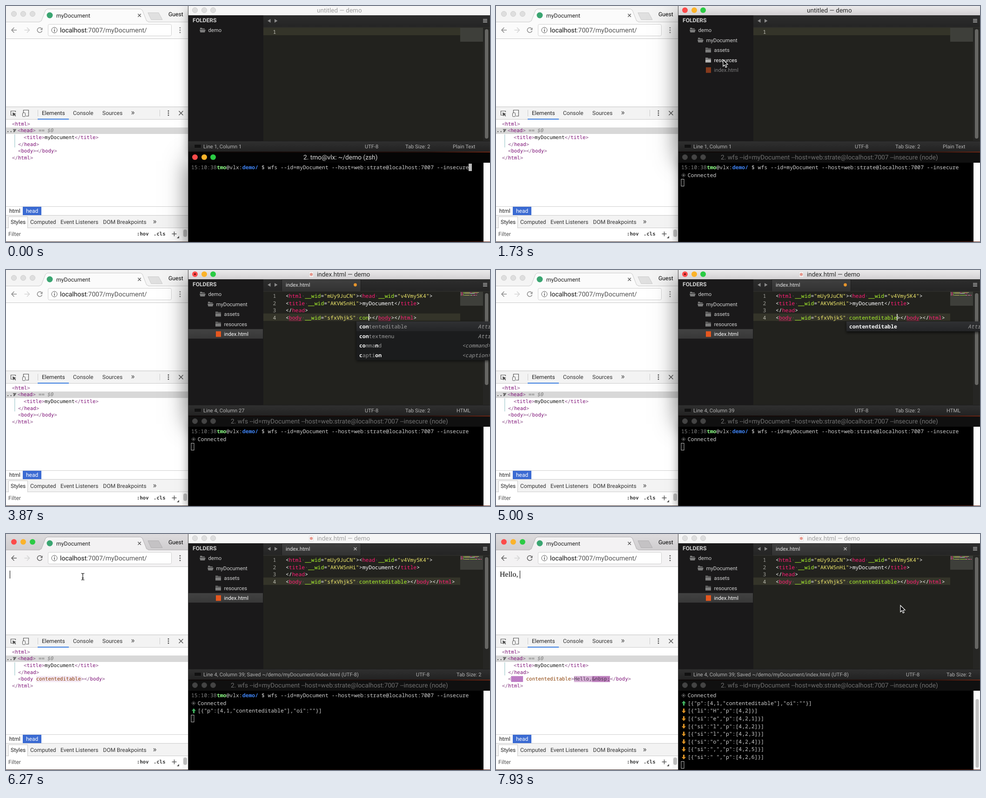
An HTML page with a canvas for the animation above (8 s loop, 1040 by 509 pixels).

```html
<!DOCTYPE html>
<html lang="en">
<head>
<meta charset="utf-8">
<title>Live document sync</title>
<style>
html, body { margin: 0; width: 100%; height: 100%; overflow: hidden; background: #000; }
canvas { display: block; width: 1040px; height: 509px; }
</style>
</head>
<body>
<canvas id="stage" width="1040" height="509"></canvas>
<script>
const c = document.getElementById('stage').getContext('2d');
const LOOP = 8000;
const UI = 'Roboto, sans-serif', CODE = '"Noto Sans Mono", monospace', DOM = '"DejaVu Sans Mono", monospace';
const ui = (n, style = '') => `${style} ${n}px ${UI}`;
const code = (style = '') => `${style} 11.43px ${CODE}`;
const dom = (style = '') => `${style} 10.7px ${DOM}`;
const CW = 6.86, DW = 6.44;
const PINK = '#ff1d74', GREEN = '#a9f52c', YELLOW = '#f1ea6c', WHITE = '#fff';
const TAG = '#7b0c74', BRACKET = '#8c548a';

// Timeline in ms
const T = { enter: 130, connect: 530, folder: 730, edit: 1450, open: 1960, click: 2900,
  type: 3640, step: 59.3, save: 5240, sync: 5400, web: 6050 };
const ADDED = ' contenteditable';
const KEYS = [6530, 6670, 6800, 6930, 7070, 7330, 7700];
const HELLO = 'Hello, ';
const COMMAND = 'wfs --id=myDocument --host=web:strate@localhost:7007 --insecure';

const clamp = (v, a = 0, b = 1) => Math.min(b, Math.max(a, v));

function rect(x, y, w, h, fill) { c.fillStyle = fill; c.fillRect(x, y, w, h); }
function round(x, y, w, h, r, fill, stroke) {
  c.beginPath(); c.roundRect(x, y, w, h, r);
  if (fill) { c.fillStyle = fill; c.fill(); }
  if (stroke) { c.strokeStyle = stroke; c.lineWidth = 1; c.stroke(); }
}
function disc(x, y, r, fill, stroke) {
  c.beginPath(); c.arc(x, y, r, 0, 7);
  if (fill) { c.fillStyle = fill; c.fill(); }
  if (stroke) { c.strokeStyle = stroke; c.lineWidth = 1; c.stroke(); }
}
function poly(pts, fill, stroke, width = 1, close = true) {
  c.beginPath();
  for (let i = 0; i < pts.length; i += 2) c.lineTo(pts[i], pts[i + 1]);
  if (close) c.closePath();
  if (fill) { c.fillStyle = fill; c.fill(); }
  if (stroke) { c.strokeStyle = stroke; c.lineWidth = width; c.stroke(); }
}
const line = (pts, color, width = 1) => poly(pts, null, color, width, false);
function text(s, x, y, color, font) {
  c.font = font; c.fillStyle = color; c.fillText(s, x, y);
}
function fade(y0, y1, a, b) {
  const g = c.createLinearGradient(0, y0, 0, y1);
  g.addColorStop(0, a); g.addColorStop(1, b);
  return g;
}
function lights(xs, y, on, off, edge, dirty) {
  xs.forEach((x, i) => disc(x, y, on ? 6 : 5.6, on ? ['#fc4b4a', '#fbb32a', '#2bcb44'][i] : off, on ? null : edge));
  if (dirty) disc(xs[0], y, 2, '#6a0b0a');
}
const blink = (t, since) => (t - since) % 1060 < 530;

// Shadow a window throws on the browser to its left
function shade(y, h, front) {
  c.save();
  c.beginPath(); c.rect(0, 0, 391, 509); c.clip();
  c.shadowColor = `rgba(0,0,0,${front ? .6 : .42})`;
  c.shadowBlur = front ? 46 : 20;
  c.shadowOffsetY = front ? 18 : 8;
  rect(392, y, 648, h, '#000');
  c.restore();
}

function state(t) {
  const typed = clamp(Math.floor((t - T.type) / T.step) + 1, 0, ADDED.length);
  return {
    focus: t < T.edit ? 'term' : t < T.web ? 'edit' : 'web',
    open: t >= T.open, typed, dirty: typed > 0 && t < T.save,
    row: t < T.click ? 0 : 3, saved: t >= T.save, synced: t >= T.sync,
    keys: KEYS.filter(k => t >= k).length
  };
}

// ---------- Browser ----------
function browser(t, s) {
  const on = s.focus === 'web';
  rect(0, 0, 391, 509, '#fff');
  rect(0, 0, 391, 35, on ? fade(0, 35, '#dddbdd', '#cfcdcf') : '#f4f4f4');
  lights([17, 37, 57], 17, on, '#dedede', '#cfcfcf');
  const bar = on ? '#f3f2f3' : '#fbfbfb', edge = on ? '#b2b0b2' : '#cbcbcb';
  line([0, 34.5, 391, 34.5], edge);
  poly([71, 35, 76, 32, 85, 9, 89, 6.5, 289, 6.5, 293, 9, 302, 32, 307, 35], bar);
  line([71, 34.5, 76, 32, 85, 9, 89, 6.5, 289, 6.5, 293, 9, 302, 32, 307, 34.5], edge);
  poly([305, 14.5, 328, 14.5, 336, 29.5, 312, 29.5], on ? '#c4c2c4' : '#e0e0e0', edge);
  rect(0, 35, 391, 35, bar);
  disc(94, 20, 6.5, '#3aa571');
  text('myDocument', 108, 24.5, '#222', ui(12.3));
  line([283.5, 17, 290, 23.5], '#555', 1.3);
  line([290, 17, 283.5, 23.5], '#555', 1.3);
  text('Guest', 349, 21.5, '#000', ui(12.2));
  const icon = on ? '#626262' : '#8c8c8c';
  const arrow = (x, d, col) => {
    line([x - d, 52, x + d, 52], col, 1.5);
    line([x, 46.5, x + d, 52, x, 57.5], col, 1.5);
  };
  arrow(17.5, -5.5, icon); arrow(45, 5.5, '#d4d4d4');
  c.beginPath(); c.arc(72.5, 52, 5.2, .3, 5.5);
  c.strokeStyle = icon; c.lineWidth = 1.5; c.stroke();
  poly([78.5, 46.5, 78.5, 51.5, 73.5, 51.5], icon);
  round(90.5, 39.5, 265, 25, 3, '#fff', '#cfcfcf');
  disc(104, 52, 6, null, '#555');
  rect(103.3, 51, 1.5, 4.5, '#555'); rect(103.3, 48.5, 1.5, 1.5, '#555');
  text('localhost', 116, 57, '#111', ui(14));
  text(':7007/myDocument/', 173.2, 57, '#505050', ui(14));
  for (const y of [47, 52, 57]) disc(374, y, 1.5, icon);
  line([0, 70.5, 391, 70.5], '#c9c9c9');

  text(HELLO.slice(0, s.keys), 8, 92, '#000', '16px "Liberation Serif", serif');
  if (on) {
    const last = s.keys ? KEYS[s.keys - 1] : T.web;
    const w = c.measureText(HELLO.slice(0, s.keys)).width;
    if (blink(t, last)) rect(Math.floor(8 + w), 79, 1, 17, '#000');
  }
  devtools(t, s);
  if (!on) {
    shade(0, 314, s.focus === 'edit');
    shade(316, 192, s.focus === 'term');
  }
  rect(391, 0, 1, 509, '#4a4a4a');
  rect(0, 508, 392, 1, '#3c2a26');
}

function devtools(t, s) {
  rect(0, 217, 391, 28, '#f3f3f3');
  line([0, 217.5, 391, 217.5], '#c4c4c4');
  line([0, 244.5, 391, 244.5], '#ccc');
  line([15, 235.5, 10.5, 235.5, 10.5, 226.5, 20.5, 226.5, 20.5, 229], '#5a5a5a', 1.2);
  poly([14, 229.5, 22, 233, 18.8, 234, 21.5, 237, 20, 238, 17.5, 235, 15.5, 238], '#4a4a4a');
  line([37.5, 230, 37.5, 224.5, 48.5, 224.5, 48.5, 237.5, 43, 237.5], '#5a5a5a', 1.2);
  round(35.5, 230.5, 6, 8, 1, '#f3f3f3', '#5a5a5a');
  for (const x of [68.5, 330.5]) line([x, 224, x, 238], '#ccc');
  text('Elements', 77, 235, '#222', ui(12));
  text('Console', 144, 235, '#333', ui(12));
  text('Sources', 207, 235, '#333', ui(12));
  text('»', 268.5, 235, '#444', ui(17));
  rect(68, 243, 67, 2, '#3d7fe0');
  for (const y of [226.5, 231, 235.5]) disc(349, y, 1.4, '#555');
  line([371.5, 226.5, 380.5, 235.5], '#555', 1.5);
  line([380.5, 226.5, 371.5, 235.5], '#555', 1.5);

  const rowY = i => 257.5 + i * 14.7;
  rect(0, 262, 391, 14, '#d8d8d8');
  rect(18, 277, 1.5, 28, '#b5d6d8');
  text('...', 1, rowY(1), '#444', dom('bold'));
  poly([14.5, 265.5, 22.5, 265.5, 18.5, 272], '#6a6a6a');
  tag('<html>', 13, rowY(0));
  text('== $0', 70, rowY(1), '#777', dom('italic'));
  tag('<head>', 25, rowY(1));
  tag('<title>', 38, rowY(2));
  text('myDocument', 38 + 7 * DW, rowY(2), '#111', dom());
  tag('</title>', 38 + 17 * DW, rowY(2));
  tag('</head>', 26, rowY(3));
  bodyRow(t, s, rowY(4));
  tag('</html>', 13, rowY(5));

  line([0, 432.5, 391, 432.5], '#d0d0d0');
  text('html', 7, 446, '#222', ui(12));
  rect(36, 433, 40, 18, '#3b6bd3');
  text('head', 43, 446, '#fff', ui(12));
  rect(0, 451, 391, 28, '#f3f3f3');
  line([0, 451.5, 391, 451.5], '#ccc');
  line([0, 478.5, 391, 478.5], '#ccc');
  poly([5.5, 479, 5.5, 454.5, 46.5, 454.5, 46.5, 479], '#fff', '#ccc');
  rect(6, 477, 40, 3, '#fff');
  text('Styles', 10, 470, '#222', ui(12));
  text('Computed', 52, 470, '#333', ui(12));
  text('Event Listeners', 117, 470, '#333', ui(12));
  text('DOM Breakpoints', 208.5, 470, '#333', ui(12));
  text('»', 315.5, 470, '#444', ui(17));
  text('Filter', 5, 495.5, '#555', ui(12));
  text(':hov', 281, 495, '#333', dom('bold'));
  text('.cls', 317, 495, '#333', dom('bold'));
  line([356.5, 491.5, 366.5, 491.5], '#555', 1.5);
  line([361.5, 486.5, 361.5, 496.5], '#555', 1.5);
  poly([372, 496, 372, 501, 367, 501], '#555');
  rect(379, 480, 12, 28, '#f8f8f8');
  round(381, 482, 8, 16, 4, '#bcbcbc');
}

function tag(s, x, y) {
  const [, open, name] = s.match(/(<\/?)(\w+)/);
  text(open, x, y, BRACKET, dom());
  text(name, x + open.length * DW, y, TAG, dom());
  text('>', x + (s.length - 1) * DW, y, BRACKET, dom());
}

function flash(x, y, n, a) {
  if (a > 0) rect(x, y - 10, n * DW, 13, `rgba(150,50,150,${a})`);
}

function bodyRow(t, s, y) {
  let x = 26;
  const ago = s.keys ? t - KEYS[s.keys - 1] : 1e4, heat = clamp(1 - ago / 1000);
  if (!s.synced) { tag('<body>', x, y); tag('</body>', x + 6 * DW, y); return; }
  text('<', x, y, BRACKET, dom());
  text('body', x + DW, y, TAG, dom());
  if (heat > 0) {
    c.save();
    c.globalAlpha = clamp(heat * 1.25);
    c.beginPath(); c.rect(x + DW, y - 10, 4 * DW, 13); c.clip();
    rect(x, y - 10, 5 * DW, 13, '#b873c0');
    for (let i = 0; i < 14; i++) line([x + i * 4 - 10, y + 3, x + i * 4 + 3, y - 10], '#cf9ad5', .8);
    c.restore();
  }
  x += 6 * DW;
  flash(x, y, 15, .9 * clamp(1 - (t - T.sync) / 1000));
  text('contenteditable', x, y, '#8a3f04', dom());
  x += 15 * DW;
  text('>', x, y, BRACKET, dom());
  x += DW;
  const word = HELLO.slice(0, Math.min(s.keys, 6)), nbsp = s.keys > 6 ? '&nbsp;' : '';
  flash(x, y, word.length, .5 * heat);
  flash(x + word.length * DW, y, nbsp.length, .8 * heat);
  text(word + nbsp, x, y, '#4c3a4e', dom());
  tag('</body>', x + (word + nbsp).length * DW, y);
}

// ---------- Editor ----------
function tokens(src) {
  const out = [];
  let inside = false;
  for (const m of src.matchAll(/(<\/?)(\w+)|( )|("[^"]*")|(\w+)|([=>])/g)) {
    if (m[1]) { out.push([m[1], WHITE], [m[2], PINK]); inside = true; }
    else if (m[3]) out.push(['·', '#6a6a5e']);
    else if (m[4]) out.push([m[4], YELLOW]);
    else if (m[5]) out.push([m[5], inside ? GREEN : WHITE]);
    else { out.push([m[6], WHITE]); if (m[6] === '>') inside = false; }
  }
  return out;
}
const source = s => [
  '<html __wid="mUy9JuCN"><head __wid="v4Vmy5K4">',
  '<title __wid="AKVW5nHi">myDocument</title>',
  '</head>',
  `<body __wid="sfxVhjkS"${ADDED.slice(0, s.typed)}></body></html>`
];

function folder(x, y, open, col) {
  if (open) {
    poly([x + 1, y - 5, x + 5, y - 5, x + 6, y - 3.5, x + 11, y - 3.5, x + 11, y - 1.8, x + 1, y - 1.8], col);
    poly([x, y - .8, x + 13, y - .8, x + 11, y + 5, x + 1.5, y + 5], col);
  } else {
    poly([x, y - 5, x + 5, y - 5, x + 6, y - 4, x + 12, y - 4, x + 12, y - 2.8, x, y - 2.8], col);
    rect(x, y - 1.8, 12, 7, col);
  }
}

function sidebar(t, s, mouse) {
  rect(392, 20, 161, 271, '#1a191a');
  text('FOLDERS', 401, 34.5, '#d2d2d2', ui(12.1, 'bold'));
  const rows = [['demo', 0, 1, 0], ['myDocument', 1, t >= T.edit, T.folder],
    ['assets', 2, 0, 1480], ['resources', 2, 0, 1560], ['index.html', 2, 0, 1640]];
  rows.forEach(([name, depth, open, from], i) => {
    const y = 52 + i * 21.55, x = 416 + depth * 17;
    const a = i ? clamp((t - from) / 170) : 1;
    if (!a) return;
    const picked = i === 4 && s.open;
    if (picked) rect(392, 127.5, 160, 20.5, fade(127, 148, '#424242', '#383838'));
    const hover = mouse && t < T.open && mouse.x > 392 && mouse.x < 553 && Math.abs(mouse.y - y) < 10.8 && i > 0;
    c.globalAlpha = a;
    if (i === 4) rect(x + 1, y - 6, 11, 12, '#e5571f');
    else folder(x, y, open, hover ? '#b4b4b4' : '#7c7c7c');
    text(name, x + 18.5, y + 4, hover || picked ? '#fff' : '#d0d0d0', ui(11.3));
    c.globalAlpha = 1;
  });
}

function popup(s) {
  const typed = ADDED.slice(1, s.typed);
  if (!typed || s.saved) return;
  const match = word => {
    let n = 0;
    const hit = [...word].map(ch => ch === typed[n] && ++n > 0);
    return n === typed.length && hit;
  };
  const items = [['contenteditable', 'Attr', 1014], ['contextmenu', 'Attr', 1014],
    ['command', '<command>', 980], ['caption', '<caption>', 980]].filter(it => match(it[0]));
  const h = items.length * 20.6 + 1;
  c.save();
  c.shadowColor = 'rgba(0,0,0,.7)'; c.shadowBlur = 6; c.shadowOffsetY = 2;
  rect(753, 111, 287, h, '#1b1c1d');
  c.restore();
  rect(753, 111, 287, 21, fade(111, 132, '#303133', '#242527'));
  items.forEach(([word, kind, kx], i) => {
    const y = 126.2 + i * 20.6;
    match(word).forEach((hit, j) =>
      text(word[j], 759 + j * CW, y, hit ? '#fff' : '#9a9a9a', code(hit ? 'bold' : '')));
    text(kind, kx, y, '#9a9a9a', code('italic'));
  });
}

function editor(t, s, mouse) {
  const on = s.focus === 'edit';
  rect(392, 0, 648, 20, on ? fade(0, 20, '#ebeaeb', '#d2d0d2') : '#f6f6f6');
  lights([406, 426, 445], 9, on, '#dedede', '#cfcfcf', on && s.dirty);
  const title = on ? '#2a2a2a' : '#a0a0a0';
  if (s.open) {
    c.globalAlpha = on && !s.dirty ? 1 : .6;
    round(651.5, 3.5, 9, 12, 1, '#fff', '#cfcfcf');
    disc(656, 9.5, 3.2, '#dc5a48');
    c.globalAlpha = 1;
  }
  text(s.open ? 'index.html — demo' : 'untitled — demo', 668, 14, title, ui(13.5));
  sidebar(t, s, mouse);

  rect(553, 20, 487, 27, fade(20, 46, '#2d2d2d', '#242424'));
  rect(553, 45, 487, 2, '#2c2c29');
  poly([568.5, 28, 568.5, 36, 562, 32], '#8a8a8a');
  poly([577, 28, 577, 36, 583.5, 32], '#8a8a8a');
  for (const y of [28, 31, 34]) rect(1025, y, 9, 1.6, '#a5a5a5');
  if (s.open) {
    rect(592, 20, 171, 26, fade(20, 46, '#404040', '#323232'));
    line([592.5, 46, 592.5, 20.5, 762.5, 20.5, 762.5, 46], '#1c1c1c');
    text('index.html', 601, 35.5, '#e2e2e2', ui(11.3, t < T.type ? 'italic' : ''));
    if (s.dirty) disc(750.5, 32, 3.4, '#e8952c');
    else {
      line([747.5, 29, 753.5, 35], '#b5b5b5', 1.6);
      line([753.5, 29, 747.5, 35], '#b5b5b5', 1.6);
    }
  }
  rect(553, 47, 487, 244, '#22221e');
  rect(553, 47 + s.row * 15.6, 423, 16, '#343429');
  rect(976, 47, 49, 30, '#3e3f3a');
  const lines = s.open ? source(s) : [''];
  lines.forEach((src, i) => {
    const y = 60 + i * 15.6;
    text(i + 1, 573.5, y, i === s.row ? '#bcbcb0' : '#a0a09a', code());
    let n = 0;
    for (const [str, col] of tokens(src)) {
      const x = 601 + n * CW;
      text(str, x, y, col, code('500'));
      if (str === 'body' && s.typed && on && !s.saved) rect(x, y + 2, 4 * CW, 1, '#b02254');
      if (str !== '·') {
        c.globalAlpha = .75;
        rect(977 + n * .85, 48 + i * 2, str.length * .85, 1, col);
        c.globalAlpha = 1;
      }
      n += str.length;
    }
  });
  if (on && s.open) {
    const last = s.typed ? T.type + (s.typed - 1) * T.step : s.row ? T.click : T.open;
    const col = s.row ? 22 + s.typed : 0;
    if (blink(t, last)) rect(601 + col * CW - .5, 48 + s.row * 15.6, 1.5, 14.5, '#f8f8f0');
  }
  rect(1025, 47, 15, 244, '#262624');
  round(1029, 50, 7.5, s.open ? 198 : 236, 3.7, '#666663');
  popup(s);

  rect(392, 291, 648, 23, fade(291, 314, '#303030', '#222'));
  rect(392, 291, 648, 1, '#1e1e1e');
  round(404.5, 298.5, 15, 8, 1.5, '#111', '#2e2e2e');
  const pos = `Line ${s.row + 1}, Column ${s.row ? 23 + s.typed : 1}`;
  text(pos + (s.saved ? '; Saved ~/demo/myDocument/index.html (UTF-8)' : ''), 424, 306.5, '#b2b2b2', ui(11.15));
  const right = s.saved ? [['UTF-8', 881], ['Tab Size: 2', 968]]
    : [['UTF-8', 771], ['Tab Size: 2', 858], s.open ? ['HTML', 968] : ['Plain Text', 960]];
  for (const [label, x] of right) text(label, x, 306.5, '#b2b2b2', ui(11.15));
}

// ---------- Terminal ----------
function stem(x, y, up, col) {
  const d = up ? -1 : 1;
  poly([x - 1.6, y - 5 * d, x + 1.6, y - 5 * d, x + 1.6, y, x + 4.4, y, x, y + 5.4 * d, x - 4.4, y, x - 1.6, y], col);
}

function terminal(t, s) {
  const on = s.focus === 'term', running = t >= T.enter;
  const strip = c.createLinearGradient(392, 0, 1040, 0);
  strip.addColorStop(0, '#0c0706'); strip.addColorStop(.8, '#250e0a'); strip.addColorStop(1, '#6a2514');
  rect(392, 314, 648, 2, strip);
  rect(392, 316, 648, 22, on ? '#050505' : '#101010');
  lights([406, 426, 445], 326, on, '#444', '#3a3a3a');
  text(running ? `2. ${COMMAND} (node)` : '2. tmo@vlx: ~/demo (zsh)', running ? 483 : 639, 331,
    on ? '#dcdcdc' : '#707070', ui(13.75));
  rect(392, 338, 634, 170, '#000');
  rect(1026, 338, 14, 170, '#fcfcfc');
  rect(392, 508, 648, 1, strip);

  const rows = ['prompt'];
  if (t >= T.connect) rows.push('Connected');
  if (s.synced) rows.push('[{"p":[4,1,"contenteditable"],"oi":""}]');
  const echoed = KEYS.filter(k => t >= k + 90).length;
  for (let i = 0; i < echoed; i++)
    rows.push(i ? `[{"si":"${HELLO[i]}","p":[4,2,${i}]}]` : '[{"li":"H","p":[4,2]}]');
  const skip = Math.max(0, rows.length - 9);
  rows.forEach((row, i) => {
    const y = 348.3 + (i - skip) * 16.58;
    if (i < skip) return;
    if (i === 0) {
      let x = 398;
      for (const [str, col, w] of [['15:10:38', '#808080', ''], ['tmo', '#8dfb86', 'bold'], ['@vlx:', '#c4c4c4', ''],
        ['demo/', '#3f83f2', 'bold'], [' $ ' + COMMAND, '#d0d0d0', '']]) {
        text(str, x, y + 4, col, code(w));
        x += str.length * CW;
      }
      return;
    }
    if (i === 1) {
      poly([403, y - 4.5, 407.5, y, 403, y + 4.5, 398.5, y], null, '#5c5c5c');
      poly([403, y - 2.5, 405.5, y, 403, y + 2.5, 400.5, y], '#6a6a6a');
    } else stem(403.5, y, i === 2, i === 2 ? '#43b562' : '#dd9427');
    text(row, 411.7, y + 4, '#d0d0d0', code());
  });
  const cy = running ? 340.3 + (rows.length - skip) * 16.58 : 340;
  const cx = running ? 397.5 : 994;
  if (on) rect(cx, cy, 7, 16, '#bcbcbc');
  else { c.strokeStyle = '#bcbcbc'; c.lineWidth = 1; c.strokeRect(398, Math.round(cy) + .5, 6, 15); }
  if (skip) round(1030.5, 356, 7, 148, 3.5, '#c2c2c2');
}

// ---------- Pointer ----------
const PATHS = [
  [[950, 640, 230], [1380, 474, 74], [1500, 474, 74], [1730, 488, 116], [1880, 490, 136], [2080, 490, 136],
    [2600, 751, 107], [T.type, 751, 107]],
  [[5560, 751, 107], [5960, 165, 92], [KEYS[0], 165, 92]],
  [[7500, 165, 92], [7880, 869, 154], [LOOP, 869, 154]]
];
function pointer(t) {
  const path = PATHS.find(p => t >= p[0][0] && t < p[p.length - 1][0]);
  if (!path) return null;
  const i = path.findIndex(p => p[0] > t), [t0, x0, y0] = path[i - 1], [t1, x1, y1] = path[i];
  const u = (t - t0) / (t1 - t0), e = u * u * (3 - 2 * u);
  return { x: x0 + (x1 - x0) * e, y: y0 + (y1 - y0) * e };
}
function drawPointer({ x, y }, focus) {
  const page = x < 391 && y > 70 && y < 217;
  const pane = focus === 'edit' && x > 553 && x < 976 && y > 47 && y < 291;
  c.save();
  c.translate(x, y);
  if (page || pane) {
    for (const [col, w] of page ? [['#fff', 2.6], ['#111', 1.2]] : [['#222', 2.6], ['#eee', 1.2]]) {
      line([-3.5, -7, -1, -7, 0, -6, 1, -7, 3.5, -7], col, w);
      line([-3.5, 7, -1, 7, 0, 6, 1, 7, 3.5, 7], col, w);
      line([0, -6, 0, 6], col, w);
      line([-2, 3, 2, 3], col, w);
    }
  } else {
    poly([0, 0, 0, 14, 3.2, 11, 5.6, 16.5, 8, 15.5, 5.7, 10.2, 10, 10], '#000', '#fff', 1.2);
  }
  c.restore();
}

function draw(t) {
  const s = state(t), mouse = pointer(t);
  c.textRendering = 'geometricPrecision';
  c.fontKerning = 'normal';
  rect(0, 0, 1040, 509, '#000');
  browser(t, s);
  editor(t, s, mouse);
  terminal(t, s);
  if (mouse) drawPointer(mouse, s.focus);
}

const start = performance.now();
function tick() {
  draw((performance.now() - start) % LOOP);
  requestAnimationFrame(tick);
}
tick();
</script>
</body>
</html>
```
